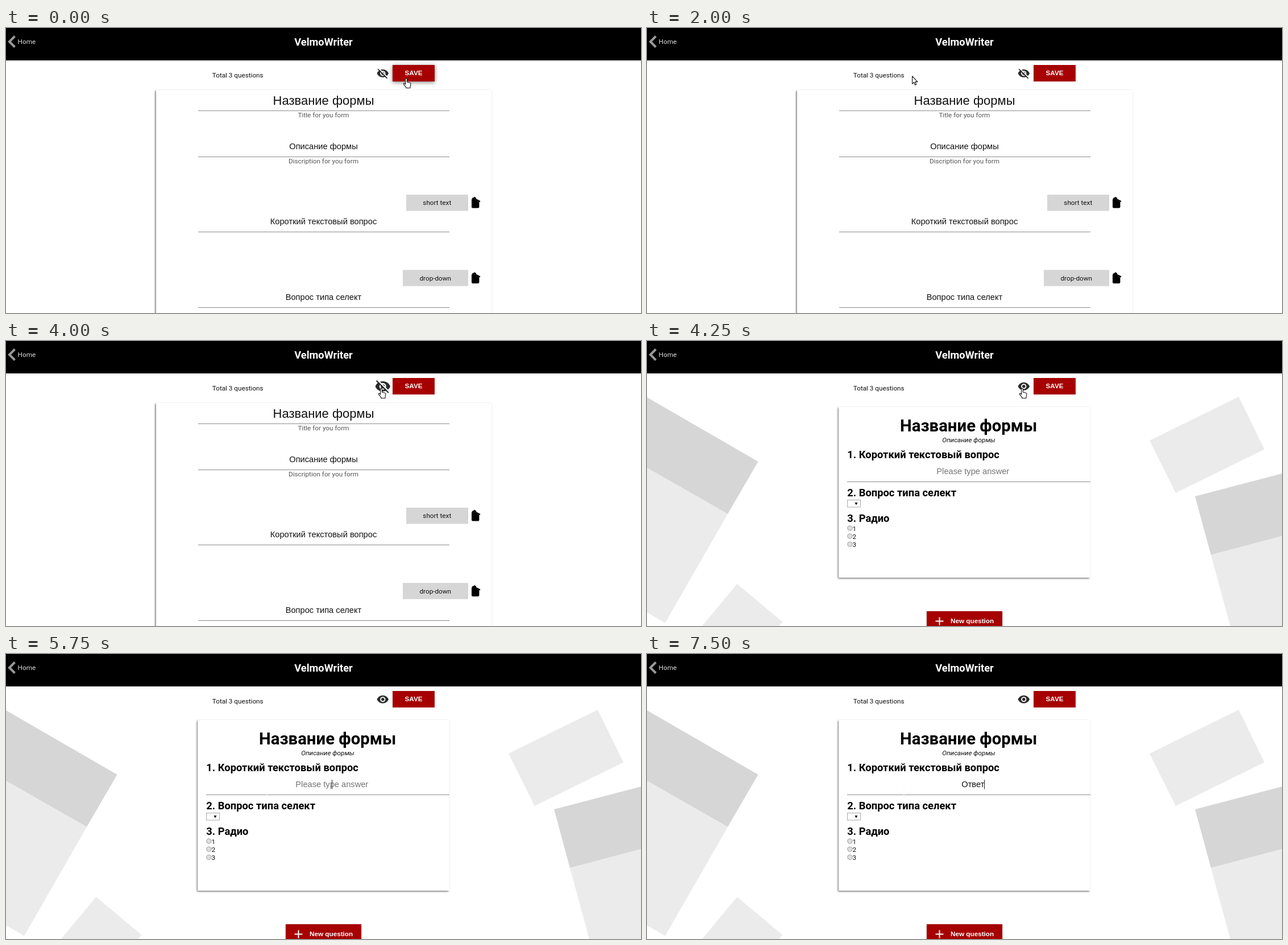
An HTML page for the animation above (8000 ms loop, 1117 by 501 pixels).

```html
<!DOCTYPE html>
<html lang="en">
<head>
<meta charset="utf-8">
<title>Form builder</title>
<style>
  html, body { margin: 0; width: 100%; height: 100%; overflow: hidden; background: #fff; }
  svg { display: block; width: 1117px; height: 501px; }
  text { font: 11.73px Roboto, sans-serif; fill: #111; white-space: pre; }
  .mid { text-anchor: middle; }
  .arial { font: 14.67px "Liberation Sans", Arial, sans-serif; }
  .big { font-size: 22px; }
  .btn { font: bold 11.73px "Liberation Sans", Arial, sans-serif; fill: #fff; }
  .brand { font-size: 18.3px; font-weight: 700; fill: #fff; }
  .h1 { font-size: 29.33px; font-weight: 700; fill: #000; }
  .h2 { font-size: 18.33px; font-weight: 700; fill: #000; }
  .hint { fill: #555; }
  .rule { stroke: #8c8c8c; fill: none; }
  .card { fill: #fff; filter: url(#cardShadow); }
  .red { fill: #a60000; }
  .pale { fill: #ebebeb; }
  .grey { fill: #d6d6d6; }
  .pointer { fill: #fff; stroke: #111; stroke-width: 1.1; stroke-linejoin: round; }
</style>
</head>
<body>
<svg viewBox="0 0 1117 501">
  <defs>
    <filter id="cardShadow" filterUnits="userSpaceOnUse" x="240" y="95" width="640" height="420">
      <feDropShadow dx="-1.5" dy="1.5" stdDeviation="1.8" flood-color="#000" flood-opacity=".55"/>
    </filter>
    <filter id="glow" filterUnits="userSpaceOnUse" x="660" y="50" width="120" height="70">
      <feDropShadow dx="0" dy="1.5" stdDeviation="3.8" flood-color="#000" flood-opacity=".5"/>
    </filter>
    <filter id="soft" filterUnits="userSpaceOnUse" x="480" y="460" width="160" height="60">
      <feDropShadow dx="0" dy="1" stdDeviation="1.5" flood-color="#000" flood-opacity=".3"/>
    </filter>
    <g id="bin">
      <path d="M0 4.6L2 3.6 13.4 9V18a2 2 0 0 1-2 2H2a2 2 0 0 1-2-2z"/>
      <path d="M1.2 2.2L3.4 1.8 4.6.2 8.2 1.9 8 3.8 15.4 7.6 14.6 9.6.4 3.2z"/>
    </g>
  </defs>

  <g id="edit">
    <rect class="card" x="264" y="109" width="590" height="420"/>
    <text class="arial big mid" x="558.5" y="134.5">Название формы</text>
    <text class="hint mid" x="558.5" y="157">Title for you form</text>
    <text class="arial mid" x="558.5" y="212.5">Описание формы</text>
    <text class="hint mid" x="558.5" y="238">Discription for you form</text>
    <text class="arial mid" x="558.5" y="344.5">Короткий текстовый вопрос</text>
    <text class="arial mid" x="558.5" y="477.5">Вопрос типа селект</text>
    <path class="rule" d="M338 145.5h442M338 226.5h442M338 358.5h442M338 491.5h442"/>
    <rect class="grey" x="704" y="293" width="109" height="28.5" rx="1"/>
    <text class="mid" x="758.3" y="311">short text</text>
    <rect class="grey" x="698" y="425.3" width="115" height="28.5" rx="1"/>
    <text class="mid" x="755.3" y="443.5">drop-down</text>
    <use href="#bin" x="819" y="296.5"/>
    <use href="#bin" x="819" y="429"/>
  </g>

  <g id="preview">
    <path class="grey" d="M0 99L195.5 212 142 304 0 223zM964 273L1117 233V343L992 376z"/>
    <path class="pale" d="M0 223L142 304 32 495.5 0 477zM158.500 427L238.500 494 232 501H97z"/>
    <path class="pale" d="M1041 98L1086 190.500 930 267 884 175zM992 376L1117 343V501H1026z"/>
    <rect class="card" x="337.5" y="116" width="442" height="300"/>
    <text class="h1 mid" x="565.7" y="159">Название формы</text>
    <text class="mid" x="566" y="178" font-style="italic" style="font-style:italic">Описание формы</text>
    <text class="h2" x="352.3" y="206">1. Короткий текстовый вопрос</text>
    <text id="field" class="arial mid" x="573.3" y="234"></text>
    <path class="rule" d="M352 247.5h428"/>
    <path id="caret" d="M0 221v16.500" stroke="#222"/>
    <text class="h2" x="352.3" y="273">2. Вопрос типа селект</text>
    <rect x="352.5" y="279.5" width="23" height="12.500" fill="#fff" stroke="#a9a9a9"/>
    <path d="M365.500 284h5l-2.500 4.500z"/>
    <text class="h2" x="352.3" y="318">3. Радио</text>
    <g id="radios"></g>
    <rect class="red" x="492" y="475" width="133" height="40" filter="url(#soft)"/>
    <path d="M507.500 492.500h14M514.500 485.500v14" stroke="#fff" stroke-width="2"/>
    <text class="btn" x="534" y="496">New question</text>
  </g>

  <rect width="1117" height="57"/>
  <path d="M15.500 14.500L6 24 15.500 33.500" fill="none" stroke="#999" stroke-width="4"/>
  <text x="20.6" y="28" style="fill:#ddd">Home</text>
  <text class="brand mid" x="558.5" y="30.5">VelmoWriter</text>
  <text x="362.8" y="86.500">Total 3 questions</text>

  <rect id="halo" class="red" x="680" y="65" width="74" height="29" filter="url(#glow)"/>
  <rect class="red" x="680" y="65" width="74" height="29"/>
  <text class="btn mid" x="717" y="82.700">SAVE</text>

  <g id="eye" fill="#2b2b2b">
    <path fill-rule="evenodd" d="M-11 0C-9.300-4.400-5-7.500 0-7.500S9.300-4.400 11 0C9.300 4.400 5 7.500 0 7.500S-9.300 4.400-11 0zM-5 0a5 5 0 0 0 10 0a5 5 0 0 0-10 0z"/>
    <circle r="3"/>
    <g id="slash" stroke-width="1.8">
      <path d="M-8.100-9.700L9.700 8.100" stroke="#fff"/>
      <path d="M-9.400-8.400L8.400 9.400" stroke="#2b2b2b"/>
    </g>
  </g>

  <g id="cursor">
    <path class="pointer" id="hand" d="M-1.400 11V1.800a1.400 1.400 0 0 1 2.800 0V7l5 1.200c1.300.3 1.800 1 1.600 2.400l-1 4.400V17.500H-.300V15.800L-4.600 10.800c-.9-1.200.6-2.300 1.600-1.500z"/>
    <path class="pointer" id="arrow" d="M0 0V13.500L3 10.800 5 15.500 7.100 14.600 5.100 10H9.200z"/>
    <path id="beam" d="M0-8V8M-2.500-8h5M-2.500 8h5" stroke="#fafafa" fill="none"/>
  </g>
</svg>
<script>
const LOOP = 8000, STEP = 250;
const $ = id => document.getElementById(id);
const show = (id, on) => $(id).style.display = on ? '' : 'none';
const within = (t, a, b) => t >= a && t < b;

// time, x, y, pointer kind from that time on
const path = [
  [0, 704, 88, 'hand'], [500, 685, 87, 'hand'], [1000, 667, 82.500, 'hand'],
  [1250, 667, 82.500, 'hand'], [1500, 640, 86, 'arrow'], [2250, 380, 84, 'beam'],
  [2500, 366, 84, 'beam'], [2750, 450, 94, 'arrow'], [3000, 570, 102, 'arrow'],
  [3250, 612, 106, 'arrow'], [3750, 657, 85, 'hand'], [4000, 660, 83, 'hand'],
  [5000, 660, 83, 'hand'], [5250, 632, 142, 'arrow'], [5500, 570, 230, 'beam'],
  [5750, 459, 243, 'beam'], [6000, 440, 254, 'beam'], [6250, 452, 244, 'beam'],
  [LOOP, 452, 244, 'beam']
];

function pointerAt(t) {
  const i = path.findIndex(k => k[0] > t);
  const [t0, x0, y0, kind] = path[i - 1], [t1, x1, y1] = path[i];
  const p = (t - t0) / (t1 - t0);
  return { x: x0 + (x1 - x0) * p, y: y0 + (y1 - y0) * p, kind };
}

$('radios').innerHTML = [1, 2, 3].map(n => {
  const y = 314.700 + n * 14.200;
  return `<circle cx="356.900" cy="${y}" r="4.100" fill="#dedede" stroke="#9c9c9c"/>
    <text x="361.600" y="${y + 4.700}">${n}</text>`;
}).join('');

function typed(t) {
  const n = t < 6750 ? 0 : t < 7000 ? 1 : t < 7250 ? 2 : t < 7500 ? 4 : 5;
  return 'Ответ'.slice(0, n);
}

function draw(time) {
  const t = Math.floor(time % LOOP / STEP) * STEP;
  const preview = t >= 4250;
  show('edit', !preview);
  show('preview', preview);
  show('slash', !preview);
  show('halo', t < 750);

  const hover = within(t, 750, 1500) || within(t, 3750, 4250) || within(t, 4500, 5250);
  $('eye').setAttribute('transform', `translate(662.800 79.800) scale(${hover ? 1.2 : 0.93})`);

  const answer = typed(t), field = $('field');
  field.textContent = answer || 'Please type answer';
  field.style.fill = answer ? '#111' : '#757575';
  const half = answer && preview ? field.getComputedTextLength() / 2 : 0;
  $('caret').setAttribute('transform', `translate(${Math.floor(573.300 + half) + 0.5} 0)`);
  show('caret', within(t, 5500, 6250) || t >= 6750);

  const c = pointerAt(t);
  $('cursor').setAttribute('transform', `translate(${c.x} ${c.y})`);
  for (const kind of ['hand', 'arrow', 'beam']) show(kind, kind === c.kind);
}

const start = performance.now();
function tick() {
  draw(performance.now() - start);
  requestAnimationFrame(tick);
}
tick();
</script>
</body>
</html>
```
